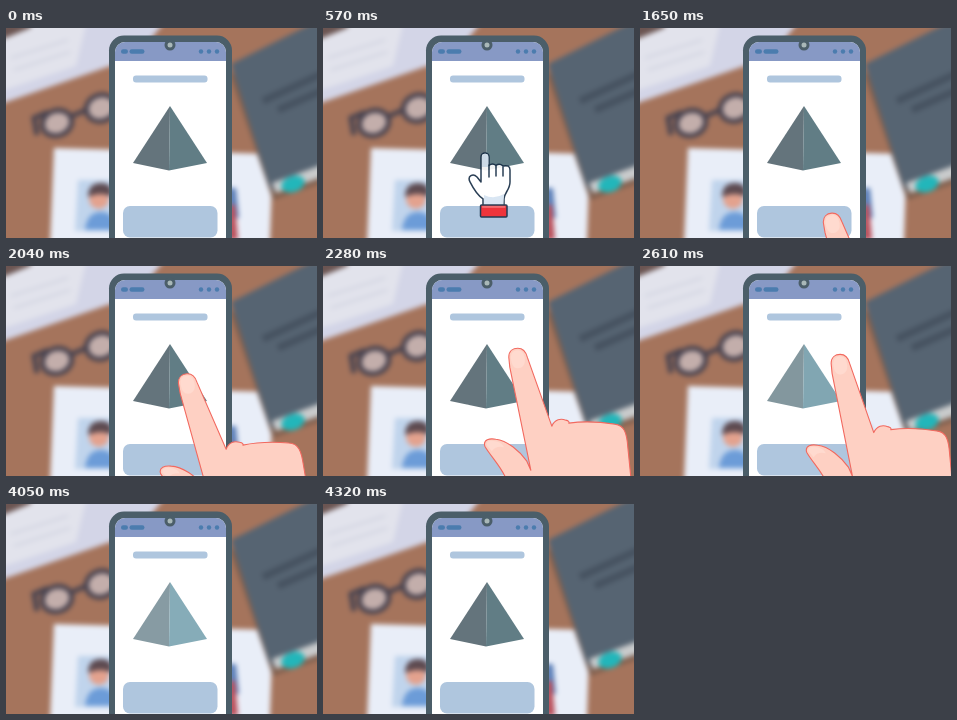
Recreate the animation shown at these times as an HTML page. Size 311 by 210 pixels, loop 4500 ms.

```html
<!DOCTYPE html>
<html lang="en">
<head>
<meta charset="utf-8">
<title>Tap and swipe</title>
<style>
  html, body { margin: 0; height: 100%; overflow: hidden; }
  svg { display: block; width: 100%; height: 100%; }
</style>
</head>
<body>
<svg viewBox="0 0 311 210">
  <defs>
    <filter id="blur" filterUnits="userSpaceOnUse" x="-30" y="-30" width="371" height="270" color-interpolation-filters="sRGB">
      <feGaussianBlur stdDeviation="2.8"/>
    </filter>
  </defs>

  <g id="desk" filter="url(#blur)">
    <path fill="#a5745c" d="M-30-30H341V240H-30z"/>
    <!-- sheets -->
    <path fill="#d3d5e7" d="M-20-20H170L130 29L-20 81z"/>
    <path fill="#e2e3ec" d="M-20-20H84L70 38L-20 68z"/>
    <path fill="none" stroke="#d0d3e0" stroke-width="2" d="M5 30L62 12M8 42L64 24"/>
    <path fill="#6b5552" d="M-30-30H40L24 0L-30 22z"/>
    <!-- glasses -->
    <g fill="#c3aeab" stroke="#4a4450" stroke-width="5">
      <path fill="none" d="M31 107L28 90L42 84M66 88L80 82"/>
      <ellipse cx="51" cy="95" rx="15" ry="12.500" transform="rotate(-20 51 95)"/>
      <ellipse cx="95" cy="80" rx="15" ry="13" transform="rotate(-20 95 80)"/>
    </g>
    <!-- printed page -->
    <path fill="#e9eef8" d="M48 120L267 126L263 240H43z"/>
    <path fill="#c0d4ec" d="M72 152H112V203H69z"/>
    <path fill="#6c9cd8" d="M79 202Q81 184 95 184T111 202z"/>
    <circle cx="93" cy="171" r="10" fill="#e3a28e"/>
    <path fill="#5d4a50" d="M82 169Q82 155 95 155T106 169Q95 163 82 169z"/>
    <path fill="#5c7fb8" d="M222 160H230L233 190H222z"/>
    <path fill="#b94e59" d="M222 177H229L232 212H222z"/>
    <!-- notebook -->
    <path fill="#80604f" d="M222 42L267 172L330 150V140z"/>
    <path fill="#566472" d="M225 36L305-4H340V142L269 164Q263 160 260 148z"/>
    <path fill="#c9cbcc" d="M266 155L340 128V141L270 165z"/>
    <path fill="none" stroke="#465260" stroke-width="7" d="M257 73L320 44M272 82L320 61"/>
    <ellipse cx="287" cy="156" rx="12" ry="8" fill="#22b6ba" transform="rotate(-18 287 156)"/>
  </g>

  <g id="phone">
    <rect x="103" y="7.500" width="123" height="230" rx="15" fill="#4b5e69"/>
    <rect x="109" y="14" width="111" height="220" rx="10" fill="#fff"/>
    <path fill="#8799c5" d="M109 33V24A10 10 0 0 1 119 14H210A10 10 0 0 1 220 24V33z"/>
    <circle cx="164" cy="17" r="5.500" fill="#4b5e69"/>
    <circle cx="164" cy="17" r="2.500" fill="#a9b8b8"/>
    <g fill="#4b7cae">
      <rect x="115" y="21.300" width="7" height="4.400" rx="2.200"/>
      <rect x="123.500" y="21.300" width="15" height="4.400" rx="2.200"/>
      <circle cx="195" cy="23.500" r="2.200"/>
      <circle cx="203" cy="23.500" r="2.200"/>
      <circle cx="211" cy="23.500" r="2.200"/>
    </g>
    <g fill="#afc6de">
      <rect x="127" y="47.500" width="74.500" height="7" rx="3"/>
      <rect x="117" y="178" width="94.500" height="31.500" rx="7"/>
    </g>
  </g>

  <path id="leftFace" d="M164 78L127 135L163 142.500z"/>
  <path id="rightFace" d="M164 78L201 135L163 142.500z"/>

  <g fill="none" stroke="#c3ced2" stroke-width=".8">
    <circle class="ring" cx="162" cy="121"/>
    <circle class="ring" cx="162" cy="121"/>
  </g>

  <g id="pointer" stroke="#152c44" stroke-width="1.500" stroke-linejoin="round" stroke-linecap="round">
    <path fill="#fff" d="M158 151V126a4 4 0 0 1 8 0V134.500q3.500-3 7 0q3.500-2.500 7 .5q7-1.500 7 4V151C187 159 181 162 181 168V175H160V168C154 164 151 159 147 151C144 145 150 142 154 146z"/>
    <path stroke="none" fill="#d6e4f2" d="M159 126a3.200 3.200 0 0 1 6.400 0V136H159zM161 164Q171 169 181 163L180.300 174H161z"/>
    <path fill="none" d="M166 134V146M173 135V145M180 136V145"/>
    <rect x="157.500" y="174" width="26.500" height="12" rx="1" fill="#f5252b"/>
    <path stroke="#ff9a98" stroke-width="1" d="M159.500 176H182"/>
  </g>

  <!-- fingertip top sits at 0,0 -->
  <g id="hand" stroke="#f2695f" stroke-width="1.100" stroke-linejoin="round">
    <path fill="#fed0c3" d="M-9 9C-9 3-5 0 0 0S8 3 9.500 9L34 78C37 71 43 70 48 72Q52 73 51 75C65 73 84 74 97 76C107 77 109 86 110 99L113 129L122 300H20L5 160Q-7 142-12 130C-17 118-28 107-33 98C-35 91-28 90-22 91C-11 92 2 103 9 113L13 122L-8 19z"/>
    <path fill="#ffdacf" stroke="none" d="M-7 10C-7 4-4 2 0 2S6 4 7 10C8 17 4 20 0 20S-6 17-7 10zM-31 97C-32 92-27 92-22 93Q-15 95-14 99Q-22 97-26 103z"/>
  </g>
</svg>

<script>
const LOOP = 4500;
const $ = id => document.getElementById(id);
const rings = document.querySelectorAll('.ring');

// time, fingertip x, fingertip y, tilt
const swipe = [
  [1410, 260, 226, 0],
  [1900, 120, 124, -8],
  [2040, 180.5, 108, -4],
  [2160, 212, 63, 2],
  [2280, 195, 82, 0],
  [2475, 109, 120, -6],
  [2610, 200, 88.5, 0.3],
  [2700, 210, 82, 1],
  [3000, 214, 162, 1],
  [3150, 256, 218, 0]
];

const progress = (t, from, to) => Math.min(1, Math.max(0, (t - from) / (to - from)));
const easeOut = p => 1 - (1 - p) ** 2;
const mix = (a, b, p) => `rgb(${a.map((v, i) => v + (b[i] - v) * p)})`;

// Monotone tangent: zero where the motion turns back
function tangent(i, k) {
  if (i === 0 || i === swipe.length - 1) return 0;
  const slope = j => (swipe[j + 1][k] - swipe[j][k]) / (swipe[j + 1][0] - swipe[j][0]);
  const a = slope(i - 1), b = slope(i);
  return a * b <= 0 ? 0 : 2 * a * b / (a + b);
}

function along(t, k) {
  let i = 0;
  while (i < swipe.length - 2 && t > swipe[i + 1][0]) i++;
  const [a, b] = [swipe[i], swipe[i + 1]];
  const span = b[0] - a[0], p = progress(t, a[0], b[0]), q = 1 - p;
  return a[k] * q * q * (1 + 2 * p) + b[k] * p * p * (3 - 2 * p)
    + span * p * q * (tangent(i, k) * q - tangent(i + 1, k) * p);
}

function draw(t) {
  const light = progress(t, 2310, 2690) - progress(t, 4020, 4320);
  $('leftFace').setAttribute('fill', mix([100, 116, 124], [139, 160, 167], light));
  $('rightFace').setAttribute('fill', mix([97, 125, 133], [138, 177, 190], light));

  const rise = easeOut(progress(t, 290, 810));
  $('pointer').setAttribute('transform', `translate(0 ${14 * (1 - rise)})`);
  $('pointer').setAttribute('opacity', progress(t, 290, 600) - progress(t, 1390, 1560));

  const tap = progress(t, 820, 1290);
  rings.forEach((ring, i) => {
    ring.setAttribute('r', (i ? 8 : 14) * tap ** 1.6);
    ring.setAttribute('opacity', tap > 0 ? Math.min(1, 3 * (1 - tap)) : 0);
  });

  const shown = t > swipe[0][0] && t < 3150;
  $('hand').setAttribute('visibility', shown ? 'visible' : 'hidden');
  $('hand').setAttribute('transform',
    `translate(${along(t, 1)} ${along(t, 2)}) rotate(${along(t, 3)})`);
}

const start = performance.now();
function tick() {
  draw((performance.now() - start) % LOOP);
  requestAnimationFrame(tick);
}
tick();
</script>
</body>
</html>
```
